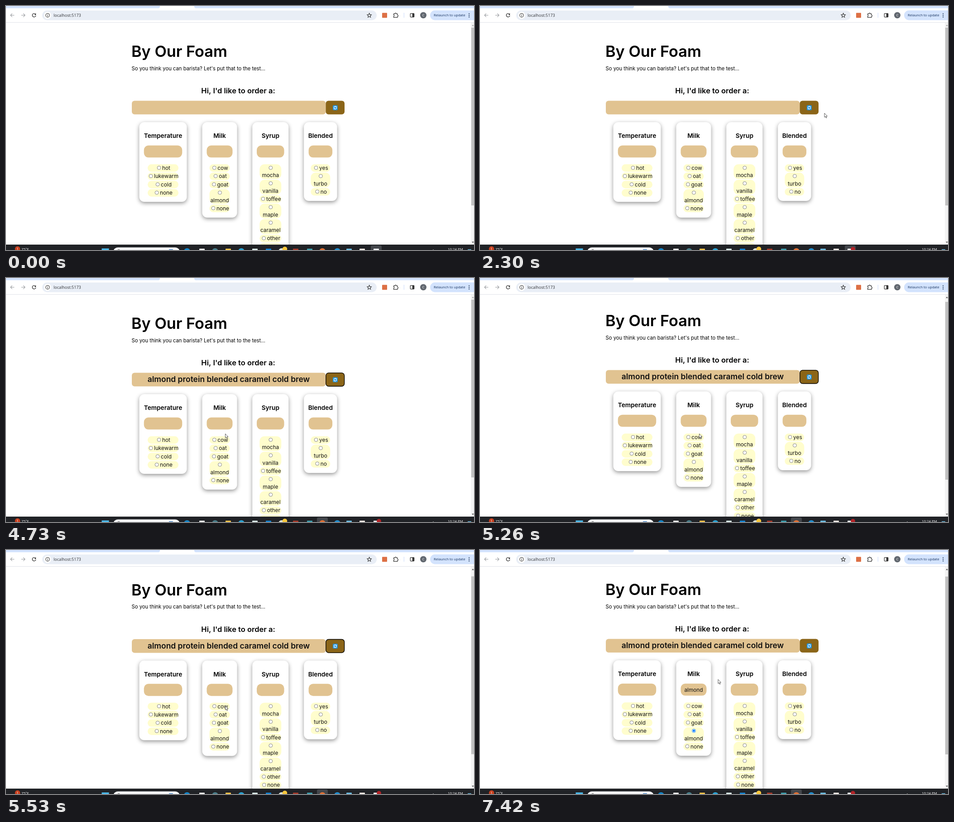
Animation, 1034 px wide and 542 px high, one loop 8 s. Source, as an HTML page with a canvas:

```html
<!DOCTYPE html>
<html lang="en">
<head>
<meta charset="utf-8">
<title>Coffee order game</title>
<style>
html, body { margin: 0; width: 100%; height: 100%; overflow: hidden; background: #fff; }
canvas { display: block; }
</style>
</head>
<body>
<canvas id="stage" width="1034" height="542"></canvas>
<script>
const ctx = document.getElementById('stage').getContext('2d');
const LOOP = 8000;
const PAGE = 'Inter, sans-serif', SYSTEM = '"Open Sans", sans-serif';
const TAN = '#e1c391', BLUE = '#d3e3fd';

// Cursor moves: start, end, number of steps, points passed through
const moves = [
  [130, 480, 6, [[955, 560], [880, 390], [830, 298]]],
  [820, 890, 2, [[830, 298], [633, 265]]],
  [1220, 1420, 4, [[633, 265], [629.5, 323.5]]],
  [1820, 2570, 12, [[629.5, 323.5], [690, 262], [761, 238], [735, 228]]],
  [3190, 3330, 3, [[735, 228], [551.5, 251]]],
  [3660, 3800, 3, [[551.5, 251], [427.5, 275]]],
  [4060, 4270, 4, [[427.5, 275], [456.5, 326]]],
  [4660, 4730, 2, [[456.5, 326], [484.5, 346]]],
  [5600, 5930, 6, [[484.5, 346], [473.5, 374.5]]],
  [6000, 6410, 7, [[473.5, 374.5], [471, 400]]],
  [7070, 7420, 6, [[471, 400], [526, 287.5]]]
];

const cards = [
  { title: 'Temperature', x: 294.5, w: 105, h: 177, slot: 84.5, pill: 68, options: ['hot', 'lukewarm', 'cold', 'none'] },
  { title: 'Milk', x: 433.5, w: 77, h: 212, slot: 57, pill: 45, options: ['cow', 'oat', 'goat', '/almond', 'none'] },
  { title: 'Syrup', x: 544.3, w: 80, h: 320, slot: 60.5, pill: 48,
    options: ['/mocha', '/vanilla', 'toffee', '/maple', '/caramel', 'other', 'none'] },
  { title: 'Blended', x: 658.2, w: 73.3, h: 175, slot: 52.5, pill: 43, options: ['yes', '/turbo', 'no'] }
];

function box(x, y, w, h, fill, r = 0, stroke, width = 1) {
  ctx.beginPath();
  ctx.roundRect(x, y, w, h, r);
  if (fill) { ctx.fillStyle = fill; ctx.fill(); }
  if (stroke) { ctx.strokeStyle = stroke; ctx.lineWidth = width; ctx.stroke(); }
}

function dot(x, y, r, fill, stroke, width = 1) {
  box(x - r, y - r, 2 * r, 2 * r, fill, r, stroke, width);
}

function shape(d, x, y, fill, stroke, width = 1) {
  const path = new Path2D(d);
  ctx.save();
  ctx.translate(x, y);
  if (fill) { ctx.fillStyle = fill; ctx.fill(path); }
  if (stroke) { ctx.strokeStyle = stroke; ctx.lineWidth = width; ctx.stroke(path); }
  ctx.restore();
}

function text(str, x, y, font, align = 'left', color = '#000') {
  ctx.font = font;
  ctx.textAlign = align;
  ctx.fillStyle = color;
  ctx.fillText(str, x, y);
}

// Completed part of a stepped change, 0 before it starts
function stepped(t, start, end, n) {
  if (t < start) return 0;
  return Math.min(n, Math.floor((t - start) * (n - 1) / (end - start) + 1e-6) + 1) / n;
}

function cursorAt(t) {
  const [start, end, n, points] = moves.findLast(m => t >= m[0]) || [];
  if (!points) return null;
  const p = stepped(t, start, end, n) * (points.length - 1);
  const i = Math.min(Math.floor(p), points.length - 2), f = p - i;
  return [0, 1].map(k => points[i][k] + (points[i + 1][k] - points[i][k]) * f);
}

function drawRadio(x, y, checked) {
  dot(x, y, 3.9, '#fff', checked ? '#0075ff' : '#767676', 0.9);
  if (checked) dot(x, y, 2.4, '#0075ff');
}

function drawCard({ title, x, w, h, slot, pill, options }, choice) {
  const cx = x + w / 2, font = '11.8px ' + PAGE;
  ctx.save();
  ctx.shadowColor = 'rgba(0,0,0,.42)';
  ctx.shadowBlur = 10;
  ctx.shadowOffsetY = 3;
  box(x, 258, w, h, '#fff', 11);
  ctx.restore();
  text(title, cx, 293, '600 13.7px ' + PAGE, 'center');
  box(cx - slot / 2, 309.7, slot, 26.9, TAN, 10);
  if (title === 'Milk' && choice) text(choice, cx, 328, font, 'center', '#111');

  let y = 351.6;
  for (const option of options) {
    const tall = option[0] === '/', label = option.replace('/', '');
    const rowHeight = tall ? 34.5 : 18.4;
    box(cx - pill / 2, y, pill, rowHeight - 1.8, '#fffdcd', 11);
    ctx.font = font;
    const left = cx - (14 + ctx.measureText(label).width) / 2;
    drawRadio(tall ? cx + 0.5 : left + 7, y + 7.8, label === choice);
    text(label, tall ? cx : left + 14, y + (tall ? 28.8 : 12.4), font, tall ? 'center' : 'left', '#111');
    y += rowHeight;
  }
}

function drawPage(t, scroll) {
  const ordered = t >= 2640, picked = t >= 6620;
  ctx.save();
  ctx.beginPath();
  ctx.rect(0, 37, 1027, 493);
  ctx.clip();
  ctx.translate(0, -scroll);
  text('By Our Foam', 277, 113, '600 34.3px ' + PAGE);
  text("So you think you can barista? Let's put that to the test...", 277.5, 142.7, '11.25px ' + PAGE);
  text("Hi, I'd like to order a:", 513, 194.3, '600 16.5px ' + PAGE, 'center');
  box(278, 210.5, 428.5, 30.3, TAN, 6);
  if (ordered) text('almond protein blended caramel cold brew', 492, 231, '600 17.45px ' + PAGE, 'center', '#111');

  box(706.5, 210.5, 41.5, 30.3, '#8b6518', 6);
  if (ordered && !picked) box(706.9, 210.9, 40.7, 29.6, null, 6, '#000', 1.3);
  box(722, 220.6, 10.8, 10.8, '#2196e3', 2);
  shape('M-3 0A3 3 0 0 1 2 -2.2M3 0A3 3 0 0 1 -2 2.2', 727.4, 226, null, '#fff', 1.3);
  shape('M3.3 -3.6V-.7H.4ZM-3.3 3.6V.7H-.4Z', 727.4, 226, '#fff');

  for (const card of cards) drawCard(card, picked ? 'almond' : '');
  ctx.restore();

  box(1027, 37, 7, 493, '#f3f3f3');
  box(1028, 48 + scroll * 0.85, 6, 395, '#c1c1c1');
  shape('M-2.3 1.5L0 -1.5L2.3 1.5Z', 1031.5, 43, scroll ? '#505050' : '#a3a3a3');
  shape('M-2.3 -1.5L0 1.5L2.3 -1.5Z', 1031.5, 525, '#505050');
}

function drawToolbar() {
  box(0, 0, 1034, 37, '#fff');
  box(-9, -9, 349, 14, BLUE, 4);
  box(416, -9, 630, 14, BLUE, 4);
  box(0, 36, 1034, 1, '#e0e3e8');
  box(80, 10, 739, 21.5, '#e9eef6', 11);

  const arrow = 'M4.3 0H-4M-.3 -3.8L-4 0L-.3 3.8';
  shape(arrow, 14, 20.5, null, '#9a9da1', 1.1);
  ctx.save();
  ctx.scale(-1, 1);
  shape(arrow, -38, 20.5, null, '#9a9da1', 1.1);
  ctx.restore();
  shape('M3 -2.6A3.9 3.9 0 1 0 3.9 .8', 62, 20.5, null, '#333', 1.3);
  shape('M4.2 -4.4V-.6H.5Z', 62, 20.5, '#333');

  dot(92, 20.7, 8, '#fff');
  dot(92, 20.7, 4.2, null, '#333', 1.1);
  box(91.5, 20.2, 1.1, 3, '#333');
  box(91.5, 18.1, 1.1, 1.1, '#333');
  text('localhost:5173', 105, 24.2, '9px ' + SYSTEM, 'left', '#303236');

  let star = 'M';
  for (let i = 0; i < 10; i++) {
    const a = i * Math.PI / 5, r = i % 2 ? 2.3 : 5;
    star += `${r * Math.sin(a)} ${-r * Math.cos(a)}${i < 9 ? 'L' : 'Z'}`;
  }
  shape(star, 802.7, 21, null, '#333', 1.1);
  box(831, 15.3, 11, 11, '#dd7045', 1);
  shape('M-4.3 -3H-1.5A1.6 1.6 0 0 1 1.7 -3H4V-.3A1.6 1.6 0 0 1 4 3V5H-4.3V2.6A1.7 1.7 0 0 0 -4.3 -.7Z',
    860.8, 20.3, null, '#333', 1.2);
  box(878.8, 15, 1, 11, '#c9dafa');
  box(893.3, 16.6, 8.4, 8, null, 1, '#333', 1.2);
  box(897.7, 16.6, 4, 8, '#333');
  dot(922, 20.5, 7, '#626870');
  text('C', 922, 23.2, '7.5px ' + SYSTEM, 'center', '#fff');
  box(937, 9.8, 108, 21.6, BLUE, 11);
  text('Relaunch to update', 945, 23.4, '7.7px ' + SYSTEM, 'left', '#17335f');
  for (const y of [17, 20.7, 24.4]) dot(1023.2, y, 1.1, '#243b5c');
}

function drawTaskbar(t) {
  const recording = t >= 130, browserActive = t >= 2640;
  box(0, 530, 1034, 12, '#202226');
  dot(25.5, 539.5, 5.8, '#c8401f');
  text('1', 25.5, 542.3, '7.5px ' + SYSTEM, 'center', '#fff');
  text('75°F', 34, 543.2, '7.8px ' + SYSTEM, 'left', '#fff');

  box(211.5, 538.5, 16, 10, '#4cb9ea');
  box(237, 536.3, 147, 20, '#f5f6f8', 10);
  dot(249, 544, 3, null, '#555');
  box(360, 540.5, 9, 6, '#4a86c5', 1);
  box(browserActive ? 687 : 806, 532, 24, 14, '#43464b', 3);

  const squares = [
    [433, '#f0f0f0'], [491, '#f2c14a'], [550, '#d9ebe8'], [580, '#1683d0'], [640, '#a43a2c'],
    [671, '#3f9dac'], [758, '#6dbbe0'], [787, '#f1e9e3'], [818, '#eef0f2']
  ];
  const circles = [[400, '#1686c9'], [462, '#4b7f8b'], [520, '#2ca4d4'], [609, '#dfe5d9'], [699, '#df7136'], [732, '#238fd0']];
  for (const [x, color] of squares) box(x - 6, 539, 12, 8, color, 1);
  for (const [x, color] of circles) dot(x, 545, 7, color);
  dot(616, 539.7, 5.3, '#f8c83e');
  if (recording) dot(824, 540, 4.8, '#b42328');

  shape('M-3 2L0 -1L3 2', 944, 542, null, '#aaa');
  text('10:24 PM', 976, 543.2, '7.8px ' + SYSTEM, 'left', '#fff');
  box(1020, 540.5, 8, 6, '#6dbbe0', 1);
}

function drawCursor([x, y]) {
  const overButton = x > 706 && x < 748 && y > 210 && y < 241;
  if (overButton) {
    shape('M-1 1Q-1 0 0 0T1.1 1V4.3L4.2 5Q5.8 5.4 5.5 7L4.7 10V12H-.8V10.5L-3.5 7.2Q-3.9 5.8 -2.6 6L-1 7.3Z',
      x - 0.5, y + 0.3, '#fff', '#222', 0.9);
  } else {
    shape('M0 0V9.2L2.1 7.3L3.6 10.7L5 10.1L3.6 6.8H6.4Z', x, y, '#fff', '#333', 0.8);
  }
}

function render(t) {
  const scrollSteps = 11 * stepped(t, 5190, 5930, 11);
  const scroll = 13 * (1 - Math.exp(-0.62 * scrollSteps));
  box(0, 0, 1034, 542, '#fff');
  drawPage(t, scroll);
  drawToolbar();
  drawTaskbar(t);
  const cursor = cursorAt(t);
  if (cursor) drawCursor(cursor);
}

const begin = performance.now();
function frame() {
  render((performance.now() - begin) % LOOP);
  requestAnimationFrame(frame);
}
frame();
</script>
</body>
</html>
```
